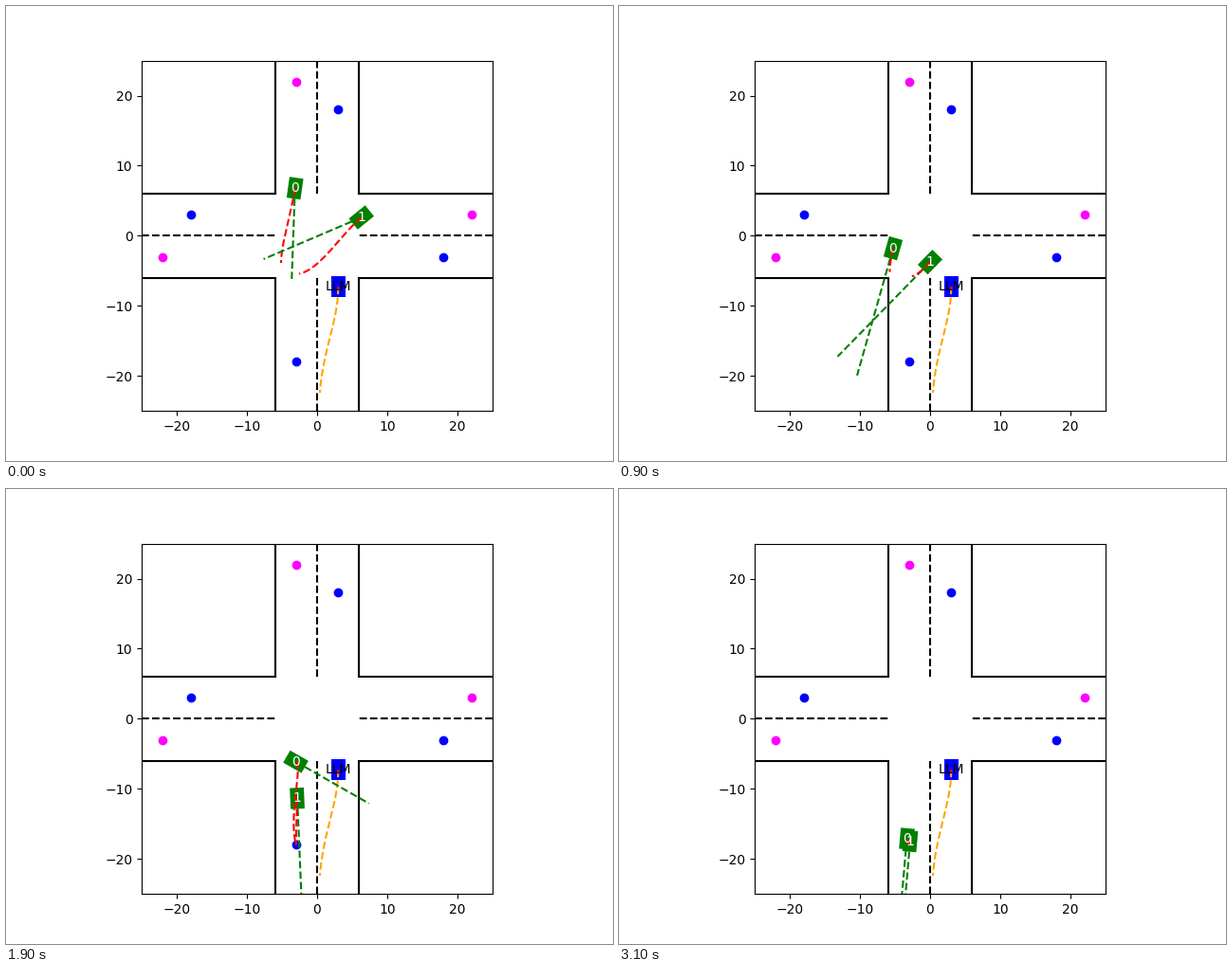
Animation of 640 by 480 pixels, one loop 3.2 s. Source, as a matplotlib script:

```python
import numpy as np
import matplotlib.pyplot as plt
from matplotlib.animation import FuncAnimation
from matplotlib.patches import Polygon

FRAMES, STEP_MS = 32, 100
LENGTH, WIDTH = 3.0, 2.0
HORIZON = 18.5       # forecast length in steps of driving
RAMP = 3             # steps taken to change speed or settle the steering
REPLAN = 13          # step at which both cars switch to their final plan
GOAL = np.array([-3, -18])


def unit(deg):
    a = np.radians(deg)
    return np.array([np.cos(a), np.sin(a)])


def curve(start, h0, end, h1, lead, tail=0.3, n=200):
    """Bezier from start to end, leaving along h0 and arriving along h1."""
    span = np.hypot(*(end - start))
    s = np.linspace(0, 1, n)[:, None]
    b = start + lead * span * unit(h0)
    c = end - tail * span * unit(h1)
    return ((1 - s)**3 * start + 3 * s * (1 - s)**2 * b
            + 3 * s**2 * (1 - s) * c + s**3 * end)


class Stop:
    def __init__(self, step, x, y, heading, speed):
        self.step, self.heading, self.speed = step, heading, speed
        self.pos = np.array([x, y])


class Leg:
    """Drive between two stops; the forecast drifts off course at the start."""

    def __init__(self, a, b, cruise, drift, reach):
        self.a, self.b, self.cruise, self.drift = a, b, cruise, drift
        self.path = curve(a.pos, a.heading, b.pos, b.heading, reach)
        gaps = np.hypot(*np.diff(self.path, axis=0).T)
        self.dist = np.append(0, np.cumsum(gaps))
        self.times = np.linspace(a.step, b.step, 200)
        self.travel = np.cumsum(self.speed(self.times))
        self.travel -= self.travel[0]

    def speed(self, t):
        out = np.clip(1 - (t - self.a.step) / RAMP, 0, 1)
        into = np.clip(1 - (self.b.step - t) / RAMP, 0, 1)
        return (self.cruise + (self.a.speed - self.cruise) * out
                + (self.b.speed - self.cruise) * into)

    def state(self, t):
        share = np.interp(t, self.times, self.travel) / self.travel[-1]
        d = share * self.dist[-1]
        pos = np.array([np.interp(d, self.dist, col) for col in self.path.T])
        k = min(np.searchsorted(self.dist, d), len(self.dist) - 2)
        dx, dy = self.path[k + 1] - self.path[k]
        heading = np.degrees(np.arctan2(dy, dx)) % 360
        slip = self.drift * max(0, 1 - (t - self.a.step) / RAMP)
        forecast = HORIZON * self.speed(t) * unit(heading + slip)
        return pos, heading, forecast


def route(stops, *legs):
    return [Leg(a, b, *leg) for a, b, leg in zip(stops, stops[1:], legs)]


# stops: step, x, y, heading, speed; legs: cruise speed, drift, reach
ROUTE_0 = route([Stop(0, -3.15, 6.79, 262, 0.7), Stop(12, -5.93, -4.2, 256, 0.63),
                 Stop(19, -3.04, -6.13, 330, 0.65), Stop(31, -3.31, -17.13, 265, 0.9)],
                (1.02, 6, 0.3), (0.55, 0, 0.4), (0.95, 25, 0.12))
ROUTE_1 = route([Stop(0, 6.32, 2.62, 219, 0.82), Stop(12, -1.89, -5.56, 221, 0.71),
                 Stop(23, -2.69, -14.83, 270, 0.85), Stop(31, -2.84, -17.47, 265, 0.48)],
                (1.02, -16, 0.3), (0.95, 0, 0.22), (0.2, 0, 0.3))


def box(pos, heading):
    u = unit(heading) * LENGTH / 2
    v = unit(heading + 90) * WIDTH / 2
    return [pos + u + v, pos + u - v, pos - u - v, pos - u + v]


fig, ax = plt.subplots(figsize=(6.4, 4.8), dpi=100)
ax.set_aspect("equal")
ax.set(xlim=(-25, 25), ylim=(-25, 25),
       xticks=range(-20, 21, 10), yticks=range(-20, 21, 10))

# roads
for s in (-1, 1):
    for e in (-6, 6):
        ax.plot([e, e], [6 * s, 25 * s], "k-")
        ax.plot([6 * s, 25 * s], [e, e], "k-")
    ax.plot([0, 0], [6 * s, 25 * s], "k--")
    ax.plot([25 * s, 6 * s], [0, 0], "k--")

ax.scatter([3, 18, -18, -3], [18, -3, 3, -18], c="blue")
ax.scatter([-3, 22, -22], [22, 3, -3], c="magenta")


class Car:
    def __init__(self, label, color, text_color):
        self.body = ax.add_patch(Polygon(np.zeros((4, 2)), facecolor=color))
        self.forecast, = ax.plot([], [], "--", color="green")
        self.plan, = ax.plot([], [], "--", color="red")
        self.label = ax.text(0, 0, label, color=text_color,
                             ha="center", va="center")

    def place(self, pos, heading):
        self.body.set_xy(box(pos, heading))
        self.label.set_position(pos)

    def drive(self, i, legs, first_end, last_end, exit_dir):
        leg = next(leg for leg in legs if i <= leg.b.step)
        pos, heading, forecast = leg.state(i)
        self.place(pos, heading)
        self.forecast.set_data(*np.array([pos, pos + forecast]).T)
        if i < REPLAN:
            end = first_end + (last_end - first_end) * i / (REPLAN - 1)
            plan = curve(pos, heading, end, exit_dir, 0.3, 0.25)
        else:
            plan = curve(pos, heading, GOAL, 270 + (heading - 270) / 4, 0.1, 0.36)
        self.plan.set_data(*plan.T)


left = Car("0", "green", "white")
right = Car("1", "green", "white")
waiting = Car("LLM", "blue", "black")
trail = curve(np.array([3, -7.3]), 271, np.array([0.4, -22.4]), 266, 0.3, 0.4)
ax.plot(*trail.T, "--", color="orange", zorder=1.9)


def update(i):
    left.drive(i, ROUTE_0, np.array([-5.14, -3.87]), np.array([-5.95, -5.6]), 270)
    right.drive(i, ROUTE_1, np.array([-2.57, -5.42]), np.array([-2.6, -5.9]), 190)
    waiting.place(np.array([3, -7.3]), 90)
    waiting.plan.set_data([3, 3], [-7.3, -7.7])


anim = FuncAnimation(fig, update, frames=FRAMES, interval=STEP_MS,
                     init_func=lambda: update(0), repeat=True, repeat_delay=0)
plt.show()
```
